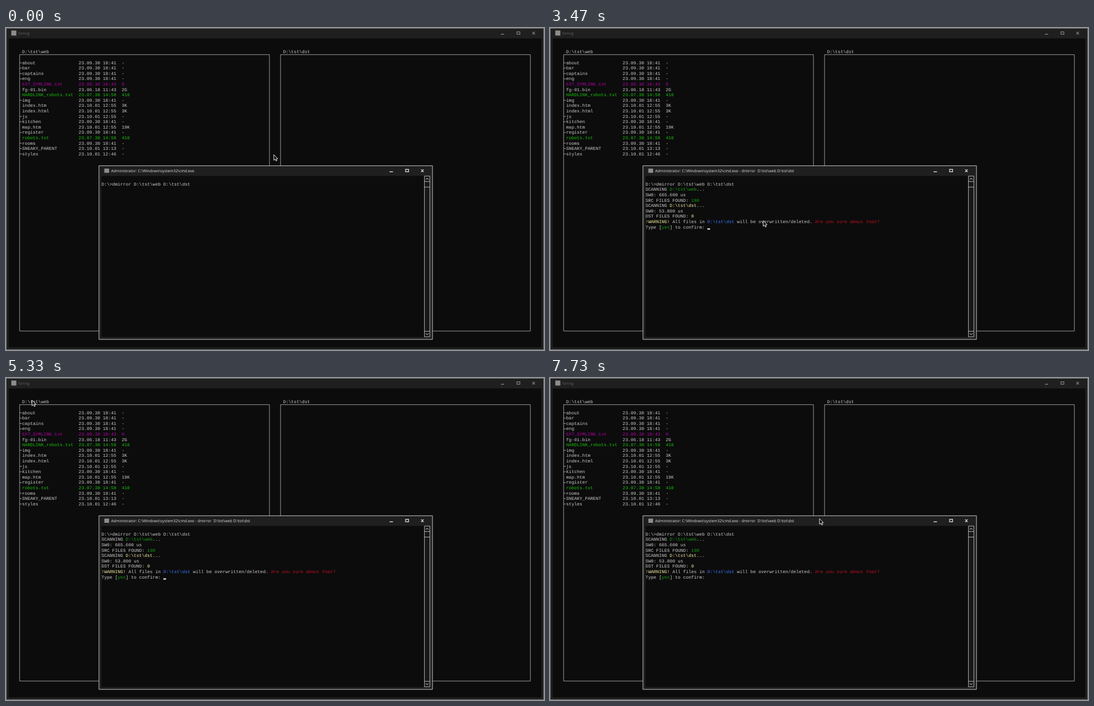
An HTML page for the animation above (8000 ms loop, 960 by 576 pixels).

```html
<!DOCTYPE html>
<html lang="en">
<head>
<meta charset="utf-8">
<title>Directory mirror</title>
<style>
html, body { margin: 0; width: 100%; height: 100%; overflow: hidden; background: #0c0c0c; }
svg { display: block; width: 960px; height: 576px; }
text { white-space: pre; text-rendering: geometricPrecision; }
.mono { font: 8px "Liberation Mono", monospace; }
.ui { font: 6.9px "Open Sans", sans-serif; }
</style>
</head>
<body>
<svg id="stage" viewBox="0 0 960 576"></svg>
<script>
const NS = 'http://www.w3.org/2000/svg';
const stage = document.getElementById('stage');
const CELL = 4.8, ROW = 9.6, BASE = 7.6, HAIR = 0.75;
const STEP = 1000 / 15, LOOP = 8000;
const C = {
  bg: '#0c0c0c', frame: '#1f1f1f', text: '#cccccc', white: '#f2f2f2', dim: '#858585',
  green: '#16c60c', darkGreen: '#13a10e', magenta: '#b400aa',
  yellow: '#f9f1a5', blue: '#3b78ff', red: '#c50f1f'
};

function add(tag, attrs, parent = stage) {
  const el = document.createElementNS(NS, tag);
  for (const key in attrs) el.setAttribute(key, attrs[key]);
  parent.appendChild(el);
  return el;
}
function fillBox(x, y, width, height, fill) {
  return add('rect', { x, y, width, height, fill });
}
function line(d, stroke, width = HAIR) {
  return add('path', { d, stroke, fill: 'none', 'stroke-width': width });
}
function outline(x1, y1, x2, y2, stroke, width) {
  return line(`M${x1} ${y1}H${x2}V${y2}H${x1}Z`, stroke, width);
}
function label(str, x, y, fill = C.text, cls = 'mono', parent) {
  const el = add('text', { x, y, fill, class: cls }, parent);
  el.textContent = str;
  return el;
}
// Parts are [string, colour] pairs laid out on the character grid
function printRow(parts, x, y, parent) {
  for (const [str, fill] of parts) {
    label(str, x.toFixed(1), y, fill, 'mono', parent);
    x += str.length * CELL;
  }
}
function buttons(xMin, xMax, xClose, y, colour) {
  line(`M${xMin - 3} ${y + 2}h6`, colour, 1.3);
  outline(xMax - 2.7, y - 2.3, xMax + 2.7, y + 1.9, colour, 1.1);
  line(`M${xClose - 2.3} ${y - 2.3}l4.6 4.6m0 -4.6l-4.6 4.6`, colour, 1.1);
}

// File manager window
fillBox(0, 0, 960, 576, C.frame);
fillBox(4.8, 18.6, 950.4, 552.6, C.bg);
outline(0.4, 0.4, 959.6, 575.6, '#aaaaaa', 0.8);
fillBox(9.5, 4.5, 9, 9, '#8c8c8c');
label('fsmng', 22, 11.8, '#606060', 'ui');
buttons(886, 914.3, 941.5, 9.2, C.dim);

const filesTop = 18.6;
const fileRow = n => (filesTop + n * ROW + BASE).toFixed(1);
outline(24.3, 47.7, 470.1, 542.1, C.text);
outline(489.9, 47.7, 935.7, 542.1, C.text);
label('D:\\tst\\web', 28.8, fileRow(2));
label('D:\\tst\\dst', 494.4, fileRow(2));

const files = `about|23.09.30 18:41|-
bar|23.09.30 18:41|-
captains|23.09.30 18:41|-
eng|23.09.30 18:41|-
EXT_SYMLINK.txt|23.09.30 18:43|0
fg-01.bin|23.06.18 11:43|2G
HARDLINK_robots.txt|23.07.30 14:58|410
img|23.09.30 18:41|-
index.htm|23.10.01 12:55|3K
index.html|23.10.01 12:55|3K
js|23.10.01 12:55|-
kitchen|23.09.30 18:41|-
map.htm|23.10.01 12:55|19K
register|23.09.30 18:41|-
robots.txt|23.07.30 14:58|410
rooms|23.09.30 18:41|-
SNEAKY_PARENT|23.10.01 13:13|-
styles|23.10.01 12:46|-`.split('\n');
files.forEach((row, i) => {
  const [name, date, size] = row.split('|');
  const y = fileRow(i + 4);
  const fill = /SYMLINK/.test(name) ? C.magenta : /robots/.test(name) ? C.green : C.text;
  label(name, 28.8, y, fill);
  label(date, 129.6, y, fill);
  label(size, 206.4, y, fill);
  if (size === '-') line(`M24.5 ${y - 2.4}h3.8`, C.text);
});

// Console window
fillBox(165.6, 246, 595.8, 311.4, C.frame);
outline(165.9, 246.4, 761, 557, '#ffffff');
fillBox(170.4, 264.6, 576, 288, C.bg);
fillBox(175.5, 251.5, 8.5, 7.5, '#8c8c8c');
const title = label('', 187.5, 258, '#e4e4e4', 'ui');
buttons(687.5, 715.7, 743, 255.2, C.white);

fillBox(746.4, 264.6, 10.2, 288, '#171717');
outline(746.7, 264.9, 756.3, 552.3, '#e8e8e8');
line('M746.7 274.6h9.6M746.7 284.6h9.6M746.7 542.6h9.6', '#e8e8e8');
line('M749 271.2l2.5 -2.5l2.5 2.5M749 546.3l2.5 2.5l2.5 -2.5', C.white, 1);

const LEFT = 170.4, TOP = 264.6;
const consoleRow = n => (TOP + n * ROW + BASE).toFixed(1);
label('D:\\>dmirror D:\\tst\\web D:\\tst\\dst', LEFT, consoleRow(1));
const output = add('g', {});
[
  [['SCANNING '], ['D:\\tst\\web', C.darkGreen], ['...']],
  [['SW0: 665.600 us']],
  [['SRC FILES FOUND: '], ['198', C.darkGreen]],
  [['SCANNING '], ['D:\\tst\\dst', C.yellow], ['...']],
  [['SW0: 53.800 us']],
  [['DST FILES FOUND: '], ['0', C.yellow]],
  [['!WARNING!', C.yellow], [' All files in '], ['D:\\tst\\dst', C.blue],
    [' will be overwritten/deleted. '], ['Are you sure about that?', C.red]],
  [['Type ['], ['yes', C.darkGreen], ['] to confirm:']]
].forEach((parts, i) => printRow(parts, LEFT, consoleRow(i + 2), output));
const caret = fillBox(LEFT + 23 * CELL, 358.4, CELL, 2.2, C.white);

const pointer = add('path', {
  d: 'M0.4 0.6V10.6L2.8 8.5L4.4 12L6 11.3L4.5 7.9H7.4Z',
  fill: '#080808', stroke: '#ffffff', 'stroke-width': 0.9
});

// Pointer stops: step, x, y
const stops = [
  [0, 477.5, 226], [44, 477.5, 226], [52, 380, 344], [54, 350, 363], [57, 489, 219],
  [59, 493, 195], [61, 486, 182], [64, 486, 182], [69, 477.5, 201], [77, 28.5, 58],
  [79, 36, 33], [80, 46, 39], [88, 490, 34], [90, 482, 39], [92, 432, 202],
  [98, 482, 252], [100, 482, 252], [101, 480.5, 251], [120, 480.5, 251]
];

// Slope at a stop; flat at turning points so the path never overshoots
function slope(i, axis) {
  const a = stops[i - 1], b = stops[i], c = stops[i + 1];
  if (!a || !c) return 0;
  const before = (b[axis] - a[axis]) / (b[0] - a[0]);
  const after = (c[axis] - b[axis]) / (c[0] - b[0]);
  return before * after <= 0 ? 0 : 2 * before * after / (before + after);
}
function along(k, axis) {
  let i = 0;
  while (i < stops.length - 2 && stops[i + 1][0] <= k) i++;
  const p = stops[i], q = stops[i + 1], span = q[0] - p[0];
  const u = (k - p[0]) / span, v = 1 - u;
  return p[axis] * (1 + 2 * u) * v * v + q[axis] * u * u * (3 - 2 * u) +
    span * u * v * (slope(i, axis) * v - slope(i + 1, axis) * u);
}

function render(ms) {
  const k = Math.floor((ms + 4) / STEP) % 120;
  const started = k >= 8;
  const name = 'Administrator: C:\\Windows\\system32\\cmd.exe' +
    (started ? ' - dmirror  D:\\tst\\web D:\\tst\\dst' : '');
  if (title.textContent !== name) title.textContent = name;
  output.style.display = started ? '' : 'none';
  const lit = started && k < 116 && (k < 21 || Math.floor((k - 21) / 8) % 2 === 1);
  caret.style.display = lit ? '' : 'none';
  pointer.setAttribute('transform', `translate(${along(k, 1).toFixed(1)} ${along(k, 2).toFixed(1)})`);
}

const start = performance.now();
function tick() {
  render((performance.now() - start) % LOOP);
  requestAnimationFrame(tick);
}
render(0);
requestAnimationFrame(tick);
</script>
</body>
</html>
```
